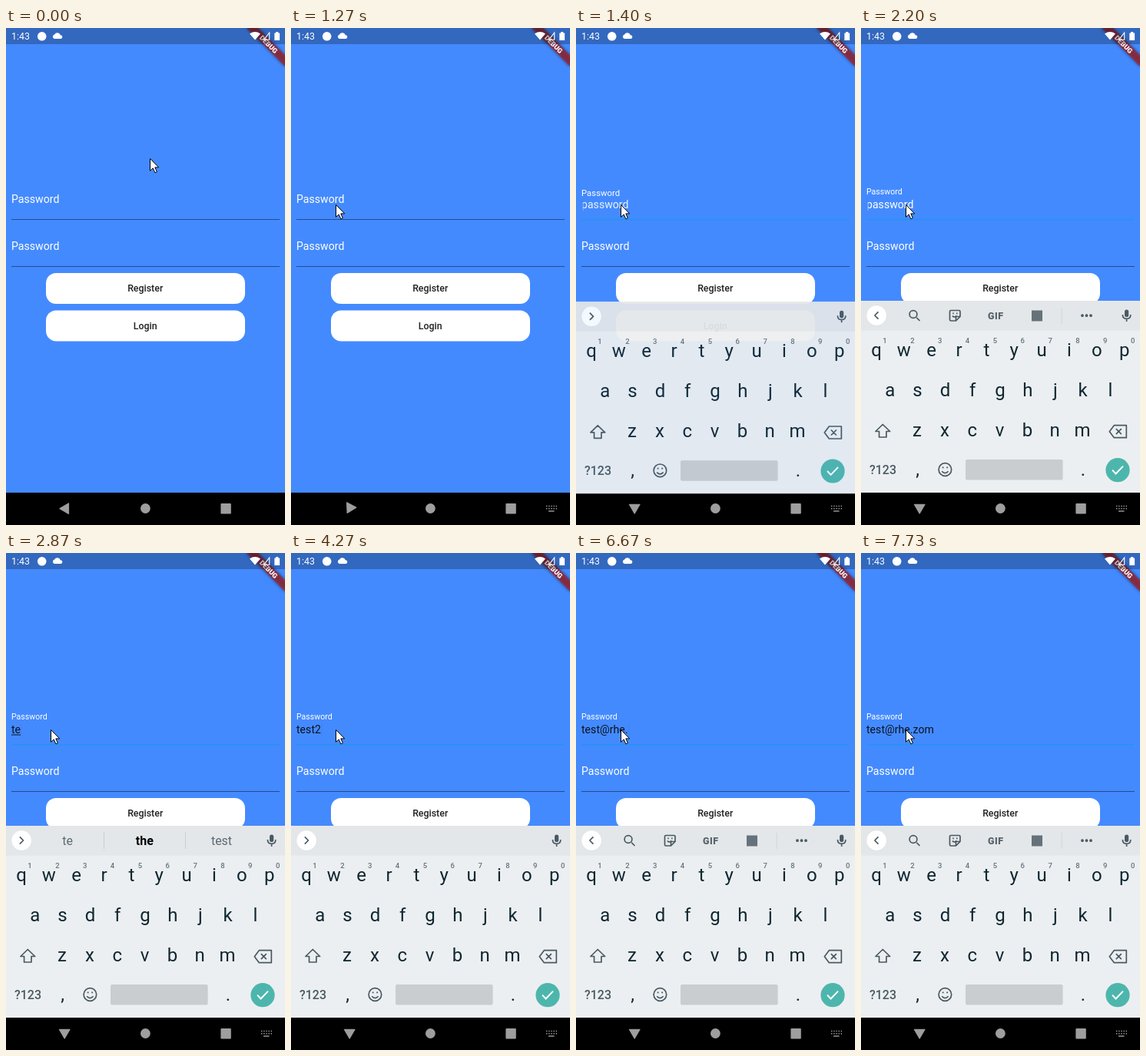
Recreate the animation shown at these times as an HTML page. Size 363x645 px, loop 8 s.

```html
<!DOCTYPE html>
<html lang="en">
<head>
<meta charset="utf-8">
<title>Sign-in form</title>
<style>
  html, body { margin: 0; width: 100%; height: 100%; overflow: hidden; background: #448aff; }
  svg { display: block; width: 363px; height: 645px; font-family: Roboto, sans-serif; }
  text { white-space: pre; }
  .mid { text-anchor: middle; }
  .field { font-size: 14.13px; }
  .button { font-size: 12.4px; font-weight: 500; fill: #212121; }
  .key { font-size: 24px; fill: #0f2731; }
  .digit { font-size: 26px; fill: #14303c; }
  .hint { font-size: 9.5px; font-weight: 500; fill: #65727a; }
  .line { fill: none; stroke: #4a5a63; stroke-width: 1.7; stroke-linejoin: round; }
  .word { font-size: 16px; fill: #5c6a72; }
  .grey { fill: #9e9e9e; }
</style>
</head>
<body>
<svg viewBox="0 0 363 645">
  <defs>
    <filter id="soft" x="-20%" y="-60%" width="140%" height="220%"><feGaussianBlur stdDeviation="2.2"/></filter>
    <g id="erase" class="line">
      <path d="M-11 0 L-5 -8 H11 V8 H-5 Z M-2.5 -3.5 L4.5 3.5 M4.5 -3.5 L-2.5 3.5"/>
    </g>
    <g id="enter">
      <circle r="15.6" fill="#4db6ac"/>
      <path d="M-7 0 L-2.5 4.8 L7 -5" fill="none" stroke="#fff" stroke-width="1.9"/>
    </g>
  </defs>

  <rect width="363" height="645" fill="#448aff"/>

  <!-- Form -->
  <text id="label" class="field" x="7" fill="#fff">Password</text>
  <text id="placeholder" class="field" x="7" y="234" fill="#fff">password</text>
  <text id="entry" class="field" x="7" y="234" fill="#000" fill-opacity=".87"></text>
  <rect id="composing" x="7" y="235.5" height="1" fill="#000" fill-opacity=".87"/>
  <rect id="caret" y="221" width="1.8" height="17" fill="#4285f4"/>
  <rect id="rule" x="7" width="349"/>
  <text class="field" x="7" y="287.5" fill="#fff">Password</text>
  <rect x="7" y="309" width="349" height="1" fill="#000" fill-opacity=".45"/>
  <g fill="#fff">
    <rect x="52" y="318" width="259" height="40" rx="13.2"/>
    <rect x="52" y="366.4" width="259" height="40" rx="13.2"/>
  </g>
  <text class="button mid" x="181.2" y="342.3">Register</text>
  <text class="button mid" x="181.2" y="390.8">Login</text>

  <!-- Status bar -->
  <g transform="translate(363 0) rotate(45)">
    <rect x="-35.3" y="24.7" width="70.6" height="10.6" opacity=".5" filter="url(#soft)"/>
    <rect x="-35.3" y="24.7" width="70.6" height="10.6" fill="#b71c1c" opacity=".627"/>
    <text class="mid" y="33.2" font-size="9" font-weight="900" fill="#fff">DEBUG</text>
  </g>
  <rect width="363" height="21" fill-opacity=".25"/>
  <g fill="#fff">
    <text x="7" y="15.4" font-size="12.4">1:43</text>
    <circle cx="46.7" cy="10.8" r="5.8"/>
    <path d="M63 14 a2.9 2.9 0 0 1 0 -5.6 a4.3 4.3 0 0 1 7.8 .8 a2.4 2.4 0 0 1 .3 4.8 Z"/>
    <path d="M317 7.4 Q324 2.6 331 7.4 L324 15.6 Z"/>
    <path d="M342.7 6 V15.3 H335.5 Z" fill="none" stroke="#fff" stroke-width="1.1"/>
    <path d="M349.3 6.4 H351.2 V5 H354.2 V6.4 H356.1 V16 H349.3 Z"/>
  </g>

  <!-- Navigation bar -->
  <rect y="603" width="363" height="42"/>
  <path id="back" class="grey" stroke="#9e9e9e" stroke-linejoin="round" d="M69.6 623.7 L81.6 616.7 V630.7 Z"/>
  <circle class="grey" cx="181.4" cy="623.5" r="6.4"/>
  <rect class="grey" x="279.4" y="617" width="13.4" height="13.4" rx="1"/>
  <g id="switcher" stroke="#9e9e9e" stroke-width="1.4">
    <path d="M332 620.5 H346 M332 623.7 H346" stroke-dasharray="1.4 1.75"/>
    <path d="M335 627 H342.5"/>
  </g>

  <!-- Number pad -->
  <g id="pad" opacity=".615">
    <rect y="433" width="363" height="210" fill="#eceff1"/>
    <g id="digits"></g>
    <path class="line" d="M307 513.5 V518 H325.5 V513.5"/>
    <use href="#erase" x="316" y="567"/>
    <use href="#enter" x="316" y="612.5"/>
  </g>

  <!-- Letter keyboard -->
  <g id="keyboard">
    <rect y="354" width="363" height="249" fill="#eceff1"/>
    <rect y="354" width="363" height="38.5" fill="#e4e7e9"/>
    <circle cx="20.2" cy="373" r="13.2" fill="#fff" stroke="#000" stroke-opacity=".06"/>
    <path id="chevron" class="line" d="M-2.3 -4.6 L2.3 0 L-2.3 4.6"/>
    <g id="tools">
      <path class="line" d="M72.3 375.8 L76.5 380"/>
      <circle class="line" cx="68" cy="371.5" r="4.9"/>
      <path class="line" d="M117 366.5 H127.5 Q129 366.5 129 368 V374.5 L123.5 380 H117 Q115.5 380 115.5 378.5 V368 Q115.5 366.5 117 366.5 Z M129 374.5 H123.5 V380 M119 373.5 Q121 376.5 124.5 373.5 M119.2 370.3 H120.8 M124 370.3 H125.6"/>
      <text class="mid" x="175.3" y="377.6" font-size="12.4" font-weight="900" letter-spacing=".5" fill="#56646c">GIF</text>
      <rect x="222" y="366.5" width="14" height="14" fill="#65727a"/>
      <path d="M261.2 363 V384" stroke="#cfd4d7"/>
      <path d="M288 373.2 h.01 m5.5 0 h.01 m5.5 0 h.01" stroke="#4a5a63" stroke-width="3.8" stroke-linecap="round"/>
    </g>
    <g id="suggestions">
      <path d="M127.5 362.5 V384 M233.5 362.5 V384" stroke="#c9ced1"/>
      <text class="word mid" x="80" y="379"></text>
      <text class="word mid" x="180.3" y="379" style="font-weight:700;fill:#000"></text>
      <text class="word mid" x="280.5" y="379"></text>
    </g>
    <rect x="343" y="365.5" width="5.2" height="9.6" rx="2.6" fill="#4a5a63"/>
    <path class="line" d="M340.4 372 Q340.4 377.4 345.6 377.4 Q350.8 377.4 350.8 372 M345.6 377.4 V381"/>
    <g id="letters"></g>
    <path class="line" d="M28.3 514.5 L37.7 523.5 H33 V531 H23.6 V523.5 H19 Z"/>
    <use href="#erase" x="334.3" y="523.7"/>
    <text class="mid" x="28.5" y="579" font-size="16" font-weight="500" fill="#4a5a63">?123</text>
    <circle class="line" cx="109.4" cy="573" r="8.3"/>
    <path class="line" d="M105.2 575.3 Q109.4 580 113.6 575.3 M105.7 570.3 H107.6 M111.2 570.3 H113.1"/>
    <rect x="136" y="560" width="126.6" height="26.4" rx="2" fill="#cacdcf"/>
    <use href="#enter" x="334" y="573.7"/>
  </g>

  <path id="pointer" fill="#fff" stroke="#000" stroke-linejoin="round"
        d="M.5 .5 V16.3 L4.2 12.9 L6.9 18.8 L9.4 17.7 L6.8 11.9 H11.7 Z"/>
</svg>
<script>
const LOOP = 8000;
const $ = id => document.getElementById(id);
const set = (el, attrs) => Object.entries(attrs).forEach(([k, v]) => el.setAttribute(k, v));

function addText(parent, cls, x, y, content) {
  const el = document.createElementNS("http://www.w3.org/2000/svg", "text");
  set(el, { class: cls + " mid", x, y });
  el.textContent = content;
  parent.append(el);
}

// Keyboard legends
const PITCH = 35.85;
[["qwertyuiop", 20, 426], ["asdfghjkl", 37.7, 478], ["zxcvbnm", 73, 530]].forEach(([row, x, y]) =>
  [...row].forEach((c, i) => addText($("letters"), "key", x + i * PITCH, y, c)));
[..."1234567890"].forEach((c, i) => addText($("letters"), "hint", 31 + i * PITCH, 408.6, c));
addText($("letters"), "key", 73.5, 581, ",");
addText($("letters"), "key", 289, 581, ".");
["123–", "456", "789", ",0."].forEach((row, r) =>
  [...row].forEach((c, i) => addText($("digits"), "digit", 46 + i * 90, 474 + r * 51, c)));

// Timelines of [start in ms, value]; each value holds until the next one
const entryText = [[0, ""], [2800, "t"], [2870, "te"], [3000, "tes"], [3270, "test"],
  [4270, "test2"], [4730, "test"], [5200, "test@"], [6000, "test@r"], [6270, "test@rh"],
  [6400, "test@rhe"], [6670, "test@rhe."], [7000, "test@rhe.z"], [7130, "test@rhe.zo"],
  [7270, "test@rhe.zom"]];
const words = [[0, ""], [2800, "t the to"], [2870, "te the test"], [3070, "tes test yes"],
  [3270, "tests test testing"], [4270, ""]];
const caretOpacity = [[0, 0], [1330, 1], [1670, .5], [1730, 0], [2200, 1], [3800, 0],
  [4270, 1], [5670, 0], [6000, 1], [7730, 0]];
const toolsOpacity = [[0, 0], [1470, .5], [1530, 1], [2600, 0], [4330, .5], [4400, 1]];
const backAngle = [[0, 0], [1200, -25], [1270, -62], [1330, -84], [1400, -90]];
const labelFloat = [[0, 0], [1400, .78], [1470, .97], [1530, 1]];
const keyboardOpacity = [[0, 0], [1400, .94], [1470, 1]];
const keyboardShift = [[0, 1.3], [1470, .3], [1530, 0]];
const hold = (line, t) => line.findLast(([start]) => start <= t)[1];

function movePointer(t) {
  const step = Math.min(9, Math.floor(t * .015 + .06)) / 9;
  const e = step * step * (3 - 2 * step);
  const x = 187 - 129 * e, y = 169 + 60 * e + 32 * Math.sin(Math.PI * e);
  set($("pointer"), { transform: `translate(${Math.round(x)} ${Math.round(y)})` });
}

function drawField(t) {
  const float = hold(labelFloat, t), focused = t >= 1400;
  set($("label"), { y: 227 - 11.2 * float, style: `font-size:${14.13 * (1 - .25 * float)}px` });
  set($("rule"), focused
    ? { y: 247.9, height: 1.6, fill: "#2196f3", "fill-opacity": 1 }
    : { y: 248, height: 1, fill: "#000", "fill-opacity": .45 });

  const entry = $("entry"), value = hold(entryText, t);
  if (entry.textContent !== value) entry.textContent = value;
  const width = value ? entry.getComputedTextLength() : 0;
  set($("placeholder"), { opacity: focused && !value ? Math.min(1, float + .1) : 0 });
  set($("composing"), { width: t < 4270 ? width : 0 });
  set($("caret"), { x: 7 + width, opacity: hold(caretOpacity, t) });
}

function drawKeyboard(t) {
  set($("pad"), { visibility: t >= 1330 && t < 1400 ? "visible" : "hidden" });
  set($("keyboard"), {
    opacity: hold(keyboardOpacity, t),
    transform: `translate(0 ${hold(keyboardShift, t)})`
  });
  const tools = hold(toolsOpacity, t), offered = hold(words, t).split(" ");
  set($("tools"), { opacity: tools });
  set($("chevron"), { transform: `translate(20.2 373) scale(${tools ? -1 : 1} 1)` });
  set($("suggestions"), { opacity: offered[0] ? 1 : 0 });
  $("suggestions").querySelectorAll("text").forEach((el, i) => el.textContent = offered[i] || "");
}

function render(t) {
  movePointer(t);
  drawField(t);
  drawKeyboard(t);
  set($("back"), { transform: `rotate(${hold(backAngle, t)} 76.2 623.7)` });
  set($("switcher"), { opacity: t < 1200 ? 0 : t < 1270 ? .4 : 1 });
}

function tick() {
  render(performance.now() % LOOP);
  requestAnimationFrame(tick);
}
tick();
</script>
</body>
</html>
```
